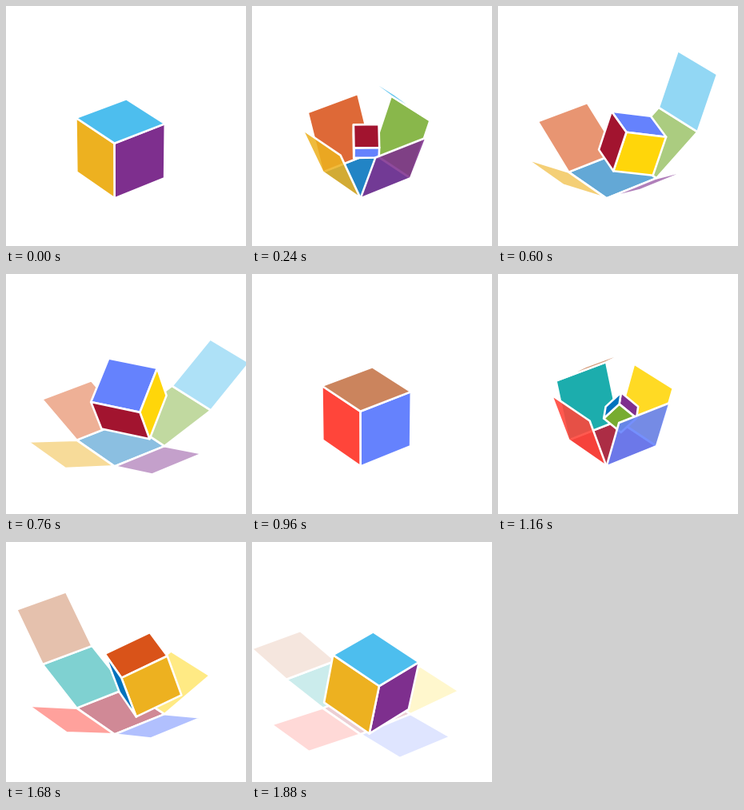
An HTML page for the animation above (1.92 s loop, 300 by 300 pixels).

```html
<!DOCTYPE html>
<html lang="en">
<head>
<meta charset="utf-8">
<title>Unfolding cubes</title>
<style>
  html, body { margin: 0; width: 100%; height: 100%; overflow: hidden; background: #fff; }
  svg { display: block; width: 100vw; height: 100vh; }
  polygon { stroke: #fff; stroke-width: 2.6; stroke-linejoin: round; }
</style>
</head>
<body>
<svg id="stage" viewBox="0 0 300 300"></svg>
<script>
const stage = document.getElementById('stage');
const STEP = 40, STEPS = 24;
const rad = deg => deg * Math.PI / 180;

// Colours: the four walls, the lid, the floor. lidWall carries the lid; spin is the inner cube's turning sense.
const boxes = [
  { colors: ['#7E2F8E', '#77AC30', '#D95319', '#EDB120', '#4DBEEE', '#0072BD'], lidWall: 1, spin: -1 },
  { colors: ['#6582FD', '#FFD60A', '#00A3A3', '#FF453A', '#CB845D', '#A2142F'], lidWall: 2, spin: 1 }
];

const corners = [[0, 0, 0], [1, 0, 0], [1, 1, 0], [0, 1, 0]];
const outward = [[0, -1], [1, 0], [0, 1], [-1, 0]];

// Camera
const AZ = rad(-37.5), EL = rad(30), UNIT = 78.9, DISTANCE = 34;
const CENTER = [-6.95, 27.65];

function project([px, py, pz]) {
  const x = px - 0.5, y = py - 0.5, z = pz - 0.5;
  const right = x * Math.cos(AZ) + y * Math.sin(AZ);
  const away = -x * Math.sin(AZ) + y * Math.cos(AZ);
  const up = away * Math.sin(EL) + z * Math.cos(EL);
  const near = z * Math.sin(EL) - away * Math.cos(EL);
  const m = 1 / (1 - near / DISTANCE);
  return [150 + (CENTER[0] + right * UNIT) * m, 150 + (CENTER[1] - up * UNIT) * m];
}

const add = (a, b) => a.map((v, i) => v + b[i]);

// Quad standing on the edge p-q, tilted outward from the vertical
function flap(p, q, [ox, oy], tilt) {
  const v = [ox * Math.sin(tilt), oy * Math.sin(tilt), Math.cos(tilt)];
  return [p, q, add(q, v), add(p, v)];
}

function foldBox(tilt, lidWall) {
  const walls = corners.map((p, i) => flap(p, corners[(i + 1) % 4], outward[i], tilt));
  const [, , q, p] = walls[lidWall];
  const lid = flap(p, q, outward[lidWall], 2 * tilt - Math.PI / 2);
  return [...walls, lid, [...corners].reverse()];
}

// Scale and turn about the middle of the floor, then lift
function placeCube([px, py, pz], size, angle) {
  const c = Math.cos(angle), s = Math.sin(angle);
  const x = (px - 0.5) * size, y = (py - 0.5) * size, z = pz * size;
  const y1 = y * c - z * s, z1 = y * s + z * c;
  return [0.5 + x * c - y1 * s, 0.5 + x * s + y1 * c, z1 + 3 * size * (1 - size)];
}

function makeFaces(quads, colors, alpha) {
  return quads.map((quad, i) => {
    const pts = quad.map(project);
    const area = pts.reduce((sum, [x, y], j) => {
      const [nx, ny] = pts[(j + 1) % 4];
      return sum + x * ny - nx * y;
    }, 0);
    return { pts, color: colors[i], alpha, inside: area > 0 };
  });
}

const polygon = f =>
  `<polygon points="${f.pts.map(p => p.map(v => v.toFixed(2)).join()).join(' ')}" ` +
  `fill="${f.color}" fill-opacity="${f.alpha.toFixed(3)}"/>`;

function draw(step) {
  const turn = Math.floor(step / STEPS) % 2;
  const p = (step % STEPS) / STEPS;
  const box = boxes[turn], next = boxes[1 - turn];
  const size = 0.2 + 0.8 * p;
  const angle = box.spin * 2 * Math.PI * (1 - size);

  const net = makeFaces(foldBox(p * Math.PI / 2, box.lidWall), box.colors, Math.sqrt(1 - p));
  net.unshift(net.pop());
  const cubeQuads = foldBox(0, next.lidWall).map(q => q.map(v => placeCube(v, size, angle)));
  const cube = makeFaces(cubeQuads, next.colors, 1);

  // Faces showing their inner side lie behind the cube, the others in front
  stage.innerHTML = [
    ...net.filter(f => f.inside),
    ...cube.filter(f => !f.inside),
    ...net.filter(f => !f.inside)
  ].map(polygon).join('');
}

const start = performance.now();
let shown = -1;
function tick() {
  const step = Math.floor((performance.now() - start) / STEP) % (2 * STEPS);
  if (step !== shown) draw(shown = step);
  requestAnimationFrame(tick);
}
tick();
</script>
</body>
</html>
```
